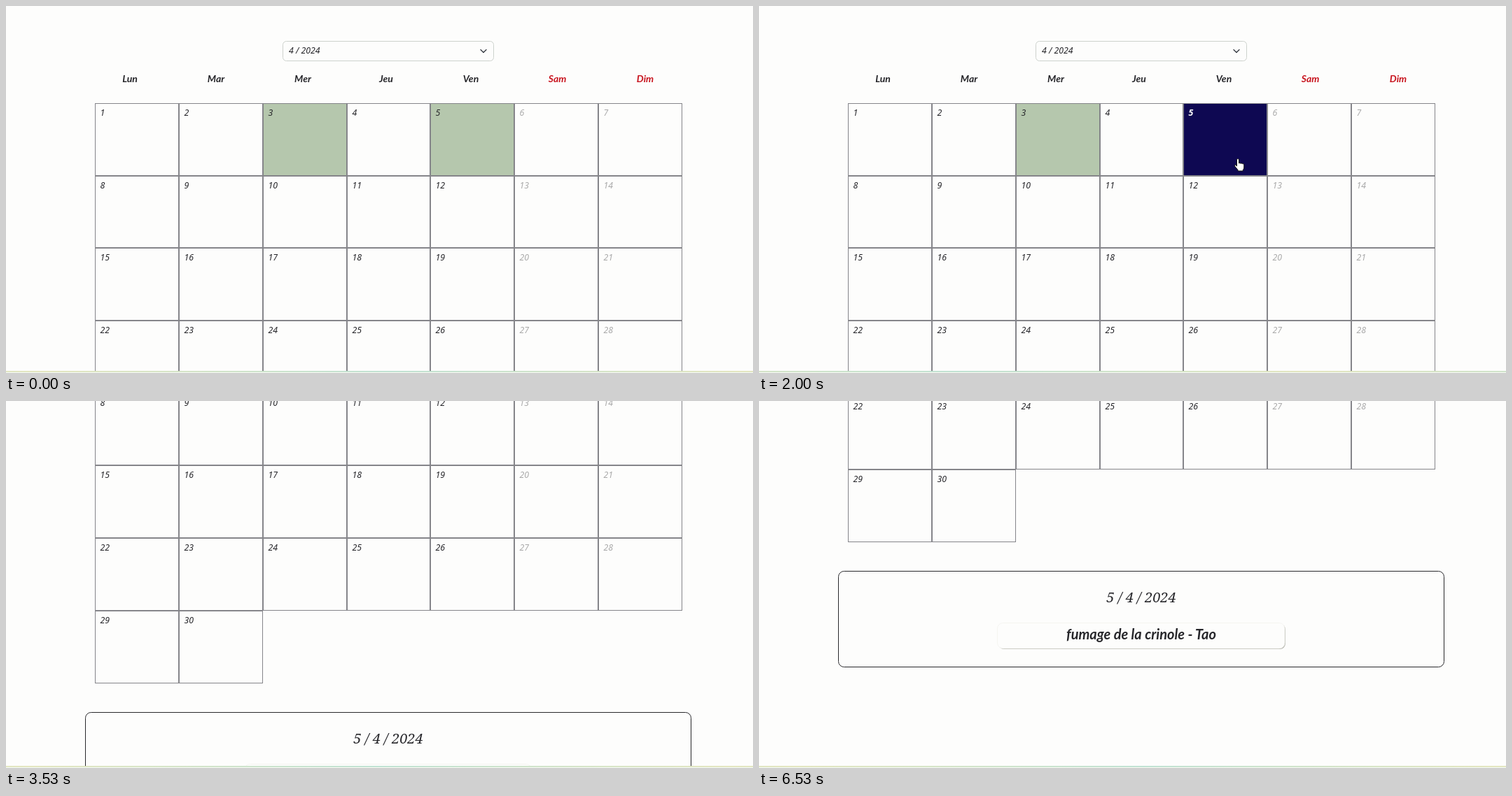
Animation of 1067 by 525 pixels, one loop 6.56 s. Source, as an HTML page:

```html
<!DOCTYPE html>
<html lang="fr">
<head>
<meta charset="utf-8">
<title>Calendrier</title>
<style>
html, body { margin: 0; width: 100%; height: 100%; overflow: hidden; background: #fdfdfc; }
svg { display: block; width: 1067px; height: 525px; }
text { font: italic 500 12.3px "Noto Sans", sans-serif; fill: #26262a; }
.head { font: italic 700 14px Lato, sans-serif; text-anchor: middle; }
.off { fill: #aaa; }
.red { fill: #c8141e; }
.date { font: italic 400 20px "Noto Serif", serif; text-anchor: middle; }
.event { font: italic 700 20px Lato, sans-serif; text-anchor: middle; }
.cell { fill: none; stroke: #85858a; shape-rendering: crispEdges; }
</style>
</head>
<body>
<svg viewBox="0 0 1067 525">
  <defs>
    <linearGradient id="bar" gradientUnits="userSpaceOnUse" x1="0" x2="500" spreadMethod="reflect">
      <stop offset="0" stop-color="#b2dccb"/>
      <stop offset="1" stop-color="#dfe1b2"/>
    </linearGradient>
  </defs>
  <g id="page">
    <rect x="395.5" y="50.5" width="301" height="28" rx="5" fill="#fdfdfc" stroke="#cdd2cd"/>
    <text x="404" y="67.5">4 / 2024</text>
    <path d="M678 62.5l4 4 4-4" fill="none" stroke="#343a40" stroke-width="1.3" stroke-linecap="round" stroke-linejoin="round"/>
    <g id="grid"></g>
    <rect x="113.5" y="699.5" width="865" height="137" rx="8" fill="none" stroke="#29292c"/>
    <text class="date" x="546" y="744">5 / 4 / 2024</text>
    <rect x="342" y="775" width="410" height="36" rx="8" fill="#b9bab2"/>
    <rect x="340.5" y="773.5" width="410.5" height="36.5" rx="8" fill="#fdfdfc" stroke="#f1f1ed" stroke-width=".7"/>
    <text class="event" x="546" y="796.5">fumage de la crinole - Tao</text>
  </g>
  <rect y="522" width="1067" height="3" fill="#f1f6ee"/>
  <rect y="522" width="1067" height="1.5" fill="url(#bar)"/>
  <g id="cursor" fill="#fff" stroke="#111" stroke-linejoin="round">
    <path id="hand" d="M-1.5 1.5Q0-.8 1.5 1.5V7q1.3-1 2.5.2 1.4-.8 2.5.5 1.8-.6 2.3 1.2V13q0 2-1.5 3.5V18H0v-1.5L-4.5 11q-.6-2 1-1.8L-1.5 11Z"/>
    <path id="arrow" d="M0 0V15L3.5 12 6 17.5 8.3 16.5 6 11H10.5Z"/>
  </g>
</svg>
<script>
const LOOP = 6560;
const $ = id => document.getElementById(id);
const GREEN = [181, 199, 173], NAVY = [14, 8, 82], INK = [38, 38, 42], WHITE = [255, 255, 255];

function add(tag, attrs, label = "") {
  const el = document.createElementNS("http://www.w3.org/2000/svg", tag);
  for (const key in attrs) el.setAttribute(key, attrs[key]);
  el.textContent = label;
  return $("grid").appendChild(el);
}

const headX = [177, 300, 424, 543, 664, 787.5, 913];
["Lun", "Mar", "Mer", "Jeu", "Ven", "Sam", "Dim"].forEach((name, i) =>
  add("text", { x: headX[i], y: 108.5, class: i > 4 ? "head red" : "head" }, name));

const colX = col => Math.round(127 + col * 119.86);
const rowY = row => Math.round(139 + row * 103.7);
const days = [];
for (let day = 1; day <= 30; day++) {
  const col = (day - 1) % 7, row = Math.floor((day - 1) / 7);
  const x = colX(col), y = rowY(row);
  const box = add("rect", {
    x: x + .5, y: y + .5, class: "cell",
    width: colX(col + 1) - x - 1, height: rowY(row + 1) - y - 1
  });
  const label = add("text", { x: x + 7.5, y: y + 18, class: col > 4 ? "off" : "" }, day);
  days[day] = { box, label };
}

// Monotone cubic through [time, value] points, at rest at both ends.
function track(points, t) {
  const last = points.length - 1;
  if (t <= points[0][0]) return points[0][1];
  if (t >= points[last][0]) return points[last][1];
  const slope = i => (points[i + 1][1] - points[i][1]) / (points[i + 1][0] - points[i][0]);
  const tangent = i => {
    if (i === 0 || i === last) return 0;
    const a = slope(i - 1), b = slope(i);
    return a * b > 0 ? 2 * a * b / (a + b) : 0;
  };
  const i = points.findIndex(p => p[0] > t) - 1;
  const [t0, v0] = points[i], [t1, v1] = points[i + 1];
  const h = t1 - t0, u = (t - t0) / h, w = 1 - u;
  return v0 * w * w * (1 + 2 * u) + v1 * u * u * (3 - 2 * u)
    + h * u * w * (w * tangent(i) - u * tangent(i + 1));
}

const scrollY = [[2850, 0], [3270, 133.5], [3870, 384], [4550, 455.6]];
const cursorX = [[650, 765], [1080, 694], [1330, 688], [1500, 684], [2150, 684], [2720, 1080]];
const cursorY = [[650, 530], [1080, 242], [1330, 229.5], [1500, 218], [2150, 218], [2720, 340]];

const mix = (a, b, p) => `rgb(${a.map((v, i) => Math.round(v + (b[i] - v) * p))})`;
const show = (id, on) => $(id).style.display = on ? "" : "none";

function draw(t) {
  $("page").setAttribute("transform", `translate(0 ${-Math.round(track(scrollY, t))})`);

  const p = Math.min(1, Math.max(0, (t - 1080) / 330));
  const picked = 1 - (1 - p) ** 2;
  days[5].box.style.fill = mix(GREEN, NAVY, picked);
  days[5].label.style.fill = mix(INK, WHITE, picked);
  days[5].label.style.fontWeight = p > 0 ? 700 : 500;

  const x = track(cursorX, t), y = track(cursorY, t);
  const over = x > colX(4) && x < colX(5) && y > rowY(0) && y < rowY(1);
  $("cursor").setAttribute("transform", `translate(${x} ${y})`);
  show("cursor", t > 650 && t < 2720);
  show("hand", over);
  show("arrow", !over);

  const shift = 400 + 150 * Math.cos(4 * Math.PI * t / LOOP);
  $("bar").setAttribute("gradientTransform", `translate(${shift} 0)`);
}

days[3].box.style.fill = `rgb(${GREEN})`;
const start = performance.now();
function tick() {
  draw((performance.now() - start) % LOOP);
  requestAnimationFrame(tick);
}
tick();
</script>
</body>
</html>
```
